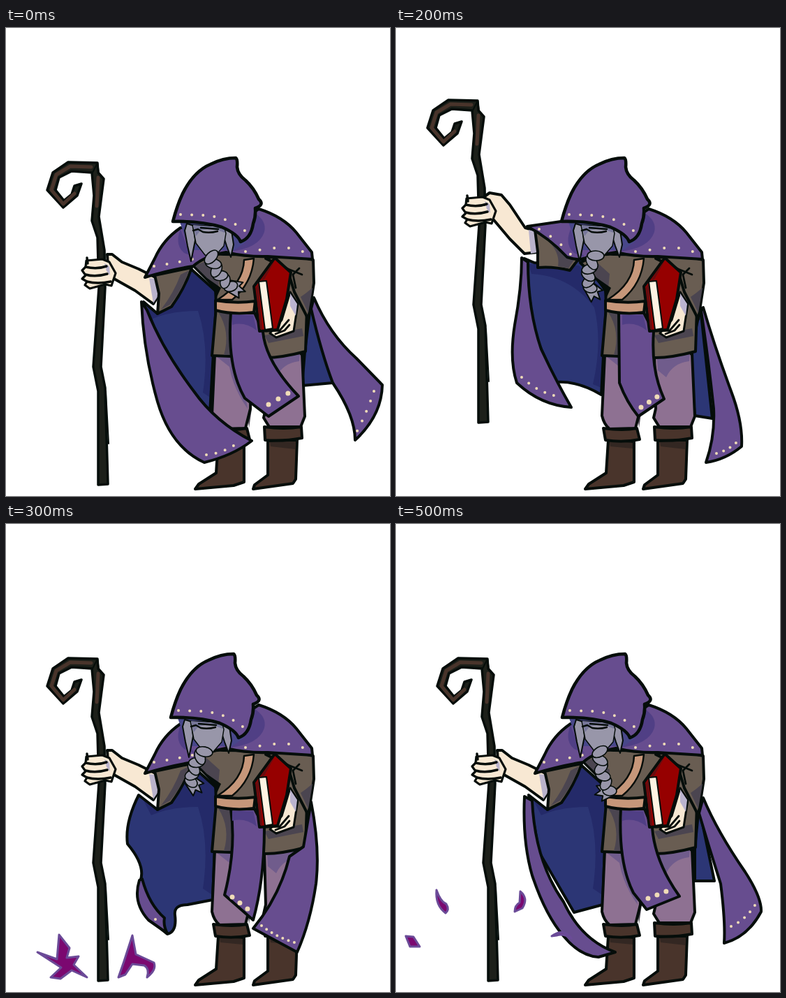
An HTML page for the animation above (600 ms loop, 550x670 px).

```html
<!DOCTYPE html>
<html lang="en">
<head>
<meta charset="utf-8">
<title>Hooded wanderer</title>
<style>
html, body { margin: 0; width: 100%; height: 100%; overflow: hidden; background: #fff; }
svg { display: block; width: 550px; height: 670px; }
path, ellipse { stroke-linejoin: round; stroke-linecap: round; }
</style>
</head>
<body>
<svg id="stage" viewBox="0 0 550 670"></svg>
<script>
const INK = '#050d0a', PURPLE = '#674d8f', PLUM = '#503f85', BLUE = '#2c3675', NAVY = '#242a69',
  CLOTH = '#695d52', DIM = '#4b4550', MAUVE = '#8e7192', DUSK = '#705c8c', BOOT = '#49342b',
  TAN = '#c6977a', SKIN = '#f8e8d3', GREY = '#9896a9', SLATE = '#77779a', BEAD = '#f0dcb8';

const shape = (fill, d, w = 4) => `<path d="${d}" fill="${fill}" stroke="${INK}" stroke-width="${w}"/>`;
const flat = (fill, d) => `<path d="${d}" fill="${fill}"/>`;
const line = (d, w = 3) => shape('none', d, w);
const at = (x, y, body) => `<g transform="translate(${x} ${y})">${body}</g>`;

// n round beads spread evenly along a path
const beads = (n, d, size = 4.5) => n ? `<path d="${d}" fill="none" stroke="${BEAD}" stroke-width="${size}"
  pathLength="${n - 0.99}" stroke-dasharray="0 1"/>` : '';

// overlapping knots along a quadratic curve, finished with a tuft
function braid([x0, y0, x1, y1, x2, y2, turn]) {
  let out = '';
  const n = 5;
  for (let i = n; i >= 0; i--) {
    const t = i / n, u = 1 - t;
    const x = u * u * x0 + 2 * u * t * x1 + t * t * x2;
    const y = u * u * y0 + 2 * u * t * y1 + t * t * y2;
    const dir = Math.atan2(u * (y1 - y0) + t * (y2 - y1), u * (x1 - x0) + t * (x2 - x1)) * 180 / Math.PI;
    out += `<ellipse cx="${x}" cy="${y}" rx="${12 - 2 * t}" ry="7" fill="${GREY}" stroke="${INK}"
      stroke-width="1.6" transform="rotate(${dir - 90 + (i % 2 ? 32 : -32)} ${x} ${y})"/>`;
  }
  const tuft = shape(GREY, 'M-8,-3 L8,-3 L12,14 L5,11 L1,22 L-3,13 L-11,17 Z', 2);
  return `<g transform="translate(${x2} ${y2}) rotate(${turn})">${tuft}</g>` + out;
}

const staff = shape('#1d201a', `M131,193 L89,192 L67,207 L59,232 L82,257 L102,240 L108,223 L98,226 L94,238
  L83,247 L71,232 L76,214 L94,205 L123,207 L126,240 L123,276 L131,300 L133,372 L125,485 L132,520 L132,654
  L146,653 L142,515 L136,485 L142,372 L141,318 L133,270 L140,216 L132,207 Z`, 3.5) +
  line('M124,207 L131,193 L133,207 M143,520 L147,595', 2) +
  `<path d="M122,199 L92,198 L72,210 L65,232 L82,252 L98,237 M132,214 L130,255" fill="none" stroke="${BOOT}" stroke-width="5"/>`;

const hand = shape(SKIN, `M115,333 L138,331 L148,335 L157,351 L151,369 L142,367 L120,373 L113,368 L116,363
  L109,359 L114,354 L109,347 L114,342 Z`, 3.2) +
  flat('#b9b2cb', 'M141,337 L148,341 L149,354 L144,348 Z') +
  line('M114,342 Q130,346 144,341 M114,353 Q128,357 145,352 M116,363 Q131,367 150,363 M116,329 L117,337', 3.5);

const legs =
  flat(DIM, 'M345,540 L352,545 L348,573 Z') +
  shape(MAUVE, 'M299,468 L295,555 Q298,568 306,574 L343,573 L350,545 Q351,515 346,468 Z') +
  flat(DUSK, 'M301,470 L335,470 L346,545 Q325,515 320,485 Z') +
  shape(MAUVE, 'M370,470 L372,545 L369,558 L377,571 L422,571 L428,556 L424,466 Z') +
  flat(DUSK, 'M374,472 L421,467 L420,477 Q396,480 387,500 L375,490 Z') +
  shape(BOOT, 'M304,590 L341,592 L341,650 L326,655 L271,660 L276,653 L301,637 Z') +
  shape(BOOT, 'M375,591 L417,590 L415,646 L411,652 L354,660 L356,654 L375,640 Z') +
  flat('#332722', 'M306,593 L339,594 L339,602 L307,599 Z M378,593 L415,592 L414,603 L379,599 Z') +
  shape(BOOT, 'M297,573 Q325,577 345,573 L349,589 Q325,594 300,590 Z') +
  shape(BOOT, 'M370,571 Q398,575 423,571 L424,587 Q398,592 371,590 Z');

const tunic =
  shape(CLOTH, 'M264,336 Q290,322 312,324 L375,325 L425,340 L431,400 L429,463 Q395,472 372,472 L295,469 L301,400 L300,372 Z') +
  flat(DIM, 'M304,407 L324,410 L322,468 L312,468 Q322,435 304,407 Z M370,440 L424,430 L426,441 L376,451 Z') +
  flat(DIM, 'M270,340 L286,334 L306,352 L303,384 L299,369 Z') +
  shape(TAN, 'M341,332 L355,330 Q352,366 324,389 L303,389 Q340,366 341,332 Z', 2.5) +
  flat(INK, 'M288,358 L308,372 L302,385 Z');

const belt = shape(TAN, 'M300,390 Q330,395 357,391 L355,407 Q326,411 300,404 Z');

const bookArm =
  shape(CLOTH, 'M372,330 Q400,322 440,332 L441,365 L433,417 L413,378 L403,345 Z') +
  flat(DIM, 'M429,380 L439,372 L433,408 L422,385 Z') +
  shape(SKIN, 'M407,378 L418,395 L412,434 L387,443 L378,437 L395,418 Z', 3) +
  flat('#bbb4cf', 'M407,380 L417,395 L415,412 L407,398 Z') +
  shape('#960000', 'M385,329 L408,350 L402,388 L389,432 L363,434 L355,370 Z', 4) +
  flat('#650d10', 'M358,372 L380,339 L384,335 L362,374 L367,431 L364,431 Z') +
  shape('#fff2e3', 'M362,363 L373,362 L382,430 L371,432 Z', 2) +
  line('M372,434 L392,433 L405,418 M386,438 L399,433 L406,425 M404,345 L424,353 M420,344 L411,353 L415,372', 2.8);

const face =
  flat('#48478a', 'M248,278 L340,282 L343,306 L326,318 L262,318 Z') +
  shape(GREY, 'M258,280 L268,283 L270,304 L264,334 L259,312 L255,290 Z', 2) +
  shape(GREY, 'M306,284 L322,290 L325,310 L321,328 L315,312 Z', 2) +
  shape(GREY, 'M266,282 L311,284 L314,294 L311,312 L298,327 L284,325 L271,308 Z', 1.5) +
  flat(SLATE, 'M267,282 L312,286 L312,293 L296,287 L278,289 L271,298 Z') +
  line('M267,290 L274,288 L281,292 Q291,294 302,291 M278,286 L303,288', 2.4);

const hood =
  shape(PURPLE, `M238,277 Q244,254 252,237 Q268,205 292,195 Q310,186 328,186 Q331,188 330,199 Q331,210 342,218
    Q354,229 361,245 Q370,253 356,258 Q357,270 353,280 Q350,301 335,306 Q331,295 308,285 Q278,276 238,277 Z`, 4.6) +
  beads(7, 'M249,267 L285,268 Q319,272 341,290', 4);

const mantle = left => shape(PURPLE, `${left} Q285,326 315,321 Q345,328 375,327 Q405,329 439,331
    L438,321 L416,293 Q397,270 362,259 L330,280 Z`) +
  flat(PLUM, 'M355,264 Q374,276 370,292 Q362,316 320,320 L338,306 Q353,290 355,264 Z') +
  flat(PLUM, 'M250,288 L259,312 L270,328 L255,322 Q241,310 250,288 Z') +
  beads(5, 'M343,320 L370,317 Q405,311 425,320', 4);

const arms = {
  low: {
    skin: 'M145,324 L152,324 L166,335 L190,345 L214,357 L219,382 L211,395 L185,376 L153,358 L146,340 Z',
    shade: 'M205,358 L215,359 L219,382 L211,394 Z',
    sleeve: 'M213,354 L266,343 Q257,371 237,399 L217,409 L219,380 Z',
    fold: 'M250,353 L262,347 Q252,376 235,396 L222,403 Q240,380 250,353 Z',
    mantle: 'M250,286 Q225,303 213,330 L199,357 Q235,346 268,341',
    rim: 'M212,341 Q240,337 267,331'
  },
  mid: {
    skin: 'M138,294 L144,287 L156,295 L164,318 L205,347 L211,380 L190,387 L171,357 L149,322 Z',
    shade: 'M199,348 L208,349 L211,380 L202,384 Z',
    sleeve: 'M204,347 L268,343 Q255,372 241,394 L205,402 L211,380 Z',
    fold: 'M249,349 L265,345 Q252,372 238,392 L220,396 Q240,375 249,349 Z',
    mantle: 'M250,288 Q227,304 213,323 L194,344 Q235,346 268,341',
    rim: 'M210,334 Q240,336 268,331'
  },
  high: {
    skin: 'M127,241 L134,236 L151,239 L163,253 L185,286 L203,291 L203,321 L184,323 L163,302 L136,270 Z',
    shade: 'M190,289 L202,292 L203,321 L193,323 Z',
    sleeve: 'M199,289 L228,303 L262,330 L249,347 Q225,341 203,343 L203,320 Z',
    fold: 'M222,309 L255,332 L247,344 L232,341 Q235,325 222,309 Z',
    mantle: 'M243,276 L188,284 Q219,300 245,328 Q260,333 268,330',
    rim: 'M205,288 Q233,304 250,324'
  }
};

// lining, cape halves with their beads, sash, braid, hood shift; lap: right half falls over the leg
const poses = [
  {
    arm: 'low', hood: [1, 0], braid: [294, 328, 300, 352, 322, 370, -68],
    lining: 'M197,392 L217,409 L265,345 L302,378 L292,552 L225,490 Z',
    lining2: 'M436,398 L468,508 L424,512 L428,463 Z',
    left: 'M194,392 Q197,465 217,535 Q236,600 284,622 Q325,612 352,591 Q300,564 269,520 Q225,462 202,404 Z',
    leftRim: [4, 'M287,611 Q308,609 326,598'],
    right: 'M441,386 Q463,438 502,473 L539,511 Q538,555 500,590 Q500,555 468,508 Q452,466 437,402 Z',
    rightRim: [5, 'M527,520 Q519,545 503,577'],
    sash: 'M322,408 Q316,485 342,530 L376,556 L419,527 Q372,478 368,435 L356,408 Z',
    sashRim: 'M376,539 L404,523'
  },
  {
    arm: 'mid', hood: [0, 0], staff: [-4, -37], braid: [290, 326, 282, 355, 299, 368, -42],
    lining: 'M190,388 L205,402 L241,394 L265,345 L302,378 L295,566 L273,573 L205,460 Z',
    lining2: 'M436,395 L456,516 L426,520 L428,463 Z',
    left: 'M189,389 Q186,475 210,540 Q232,600 274,623 L303,618 L315,602 Q276,580 254,550 Q199,480 195,396 Z',
    leftRim: [3, 'M269,611 L295,602'],
    right: 'M438,386 Q456,450 488,505 Q516,540 515,558 Q490,601 451,610 Q461,585 461,540 Q455,465 437,400 Z',
    rightRim: [5, 'M462,599 Q484,590 502,563'],
    sash: 'M318,408 Q314,475 336,521 L370,557 L405,534 Q366,480 365,435 L355,408 Z',
    sashRim: 'M365,546 L388,532'
  },
  {
    arm: 'high', hood: [-1, 0], staff: [-14, -89], braid: [286, 326, 270, 350, 278, 372, -38],
    lining: 'M184,330 L198,336 L247,340 L266,330 L302,378 L294,525 Q260,505 230,507 L198,438 Z',
    lining2: 'M436,400 L453,559 L428,555 L421,470 Z',
    left: 'M180,329 Q180,372 170,425 Q162,475 173,508 Q207,540 251,543 Q228,503 208,460 Q189,404 189,335 Z',
    leftRim: [5, 'M180,500 Q200,519 226,526'],
    right: 'M440,400 Q456,455 480,520 Q497,565 495,599 Q472,618 444,622 Q457,585 455,545 Q447,470 437,405 Z',
    rightRim: [4, 'M459,609 Q475,605 487,594'],
    sash: 'M319,408 L320,508 Q330,535 347,556 L384,531 Q365,490 369,435 L355,408 Z',
    sashRim: 'M351,543 L374,528'
  },
  {
    arm: 'low', lap: 1, hood: [-2, 0], braid: [284, 326, 267, 344, 265, 369, -42],
    lining: `M190,388 Q170,428 174,458 Q201,490 192,512 Q182,542 206,566 L231,587
      Q245,584 242,560 Q240,545 260,545 L296,538 L302,378 L265,345 L217,409 Z`,
    left: 'M191,510 Q181,542 204,567 L231,586 Q225,575 227,564 Q205,545 195,508 Z',
    leftRim: [1, 'M214,566 l.1,.1'],
    right: 'M437,398 Q450,465 444,515 Q436,570 417,613 L354,579 Q392,533 406,476 L426,462 Z',
    rightRim: [7, 'M366,575 Q388,592 413,599'],
    sash: 'M322,408 Q330,465 313,531 L354,567 Q370,510 370,435 L356,408 Z',
    sashRim: 'M324,534 L346,551',
    sparks: [
      'M45,613 L73,623 L76,588 L91,607 L87,621 L104,619 L97,631 L116,649 L94,639 L78,651 L64,649 L79,635 Z',
      'M161,649 L169,626 L181,589 L186,616 L212,628 Q216,638 202,649 Q206,637 198,632 L181,630 L171,645 Z'
    ]
  },
  {
    arm: 'low', lap: 1, hood: [2, 0], braid: [290, 326, 299, 357, 281, 370, 72],
    lining: `M188,390 Q170,440 169,471 Q184,486 203,485 Q202,512 187,540 Q195,576 215,590
      Q210,555 246,518 Q268,518 294,531 L302,378 L265,345 L217,415 Z`,
    right: 'M437,392 Q452,445 452,492 Q449,565 437,606 L389,600 Q422,544 428,466 Z',
    rightRim: [5, 'M400,582 Q416,590 432,590'],
    sash: 'M326,408 Q336,460 335,505 L331,542 L386,550 Q379,495 370,470 L368,435 L356,408 Z',
    sashRim: 'M341,535 L370,536',
    sparks: [
      'M71,567 L83,558 L97,587 Z', 'M164,592 L174,563 L186,558 L178,582 Z',
      'M53,613 Q61,605 70,618 L61,620 L60,626 Q50,622 53,613 Z',
      'M205,603 L222,597 L239,596 L235,612 L226,620 Q220,607 205,603 Z'
    ]
  },
  {
    arm: 'low', hood: [0, 0], braid: [292, 326, 291, 356, 306, 382, 78],
    lining: 'M190,388 L217,409 L265,345 L302,378 L296,545 L255,556 L205,470 Z',
    lining2: 'M434,405 L456,511 L428,511 L428,463 Z',
    left: 'M184,390 Q181,455 195,503 Q214,560 240,590 Q263,618 290,620 L314,613 Q265,595 240,541 Q199,483 195,396 Z',
    right: 'M440,392 Q460,440 500,498 Q524,535 523,555 Q504,591 470,600 Q472,570 465,515 Q449,465 434,414 Z',
    rightRim: [5, 'M480,576 Q500,567 514,546'],
    sash: 'M322,408 Q318,485 340,528 L359,552 L406,533 Q371,484 367,435 L356,408 Z',
    sashRim: 'M361,536 L387,526',
    sparks: [
      'M58,524 Q56,546 71,557 Q77,552 72,544 Q64,541 58,524 Z',
      'M178,526 Q190,536 181,550 L170,555 Q170,546 177,542 Z',
      'M14,590 L25,591 L34,605 L20,605 Z', 'M223,590 Q240,578 251,593 Q240,586 230,589 Z'
    ]
  }
];

function draw(p) {
  const arm = arms[p.arm], [sx, sy] = p.staff || [0, 0];
  const right = shape(PURPLE, p.right) + beads(...p.rightRim, 4);
  const shadow = p.arm === 'high' ? 'M190,338 L262,340 L300,380 L294,515 L282,510 Q296,450 284,400 Q250,355 194,352 Z'
    : 'M195,392 L217,410 L265,348 L300,378 L294,530 L282,522 Q292,455 275,405 Q235,405 208,417 Z';
  return flat(BLUE, p.lining) + flat(NAVY, shadow) + line(p.lining, 4) +
    (p.lining2 ? shape(BLUE, p.lining2) : '') +
    (p.lap ? '' : right) + legs +
    (p.left ? shape(PURPLE, p.left) + beads(...(p.leftRim || [0]), 4) : '') +
    tunic + (p.lap ? right : '') +
    shape(PURPLE, p.sash) + flat(PLUM, 'M324,411 L354,411 L359,433 Q342,420 324,425 Z') +
    beads(3, p.sashRim, 7) + belt + bookArm +
    at(sx, sy, staff) + shape(SKIN, arm.skin) + flat('#b9b2cb', arm.shade) + at(sx, sy, hand) +
    shape(CLOTH, arm.sleeve) + flat(DIM, arm.fold) +
    mantle(arm.mantle) + beads(4, arm.rim, 4) +
    at(...p.hood, face) + braid(p.braid) + at(...p.hood, hood) +
    (p.sparks || []).map(d => `<path d="${d}" fill="#7b0870" stroke="#6b4b98" stroke-width="3"/>`).join('');
}

const stage = document.getElementById('stage');
stage.innerHTML = poses.map(p => `<g display="none">${draw(p)}</g>`).join('');
const groups = [...stage.children];

function tick(now) {
  const k = Math.floor(now / 100) % poses.length;
  groups.forEach((g, i) => g.setAttribute('display', i === k ? 'inline' : 'none'));
  requestAnimationFrame(tick);
}
tick(0);
</script>
</body>
</html>
```
